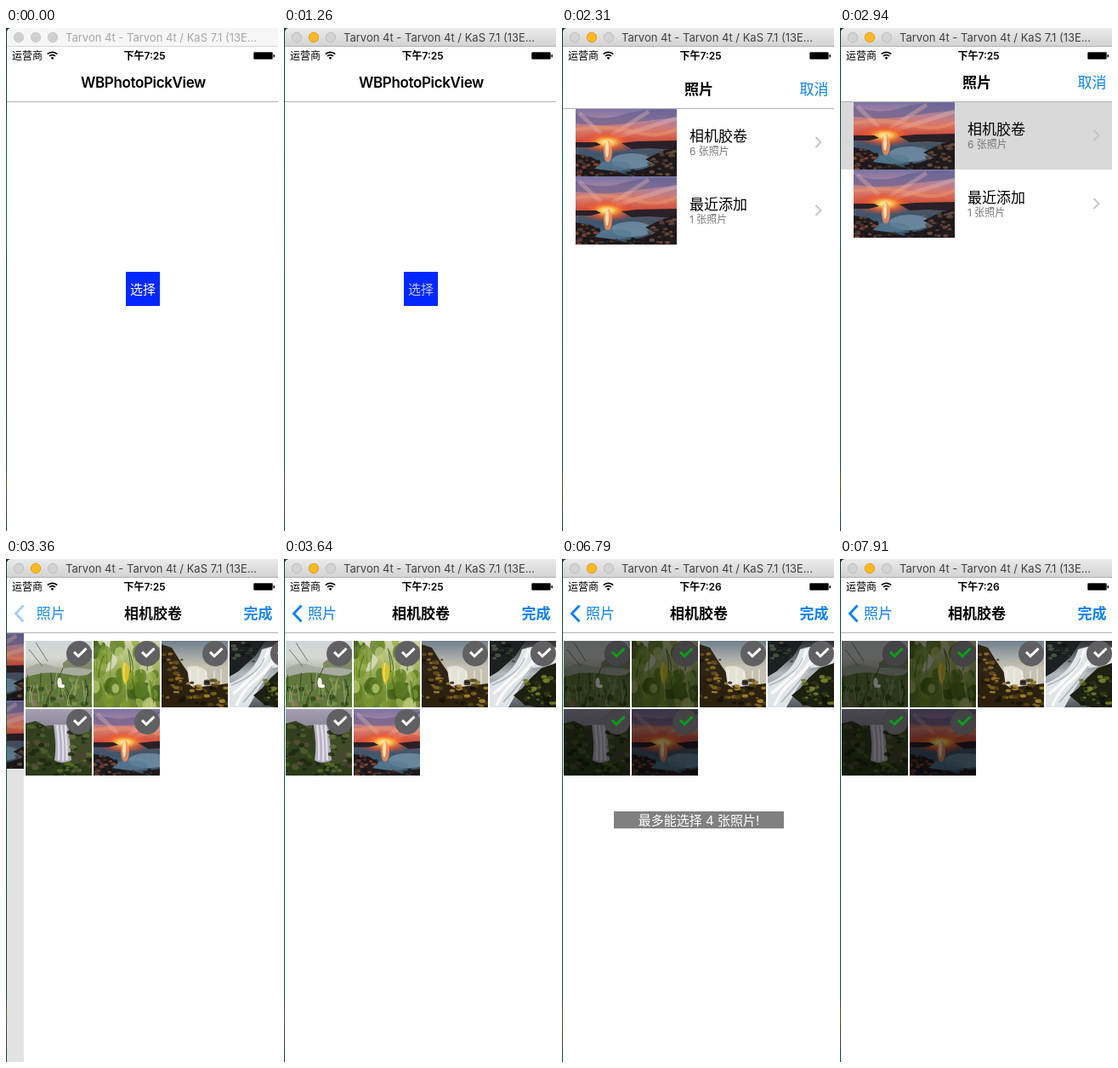
Recreate the animation shown at these times as an HTML page. Size 320 by 590 pixels, loop 8000 ms.

```html
<!DOCTYPE html>
<html lang="zh-CN">
<head>
<meta charset="utf-8">
<title>WBPhotoPickView</title>
<style>
  html, body { margin: 0; width: 100%; height: 100%; overflow: hidden; background: #fff; }
  svg#stage { display: block; width: 320px; height: 590px; }
  text { font-family: Inter, "Noto Sans CJK SC", "Noto Sans CJK", "Noto Sans", sans-serif; font-size: 17px; white-space: pre; }
  .mid { text-anchor: middle; }
  .bold { font-weight: 600; }
  .cjk { font-weight: 500; }
  .blue { fill: #0a80f5; }
  .status { font-size: 12px; }
  .small { font-size: 12px; fill: #777; }
  .note { font-size: 15px; fill: #fff; }
  .line { fill: none; stroke-linecap: butt; stroke-linejoin: miter; }
</style>
</head>
<body>
<svg id="stage" viewBox="0 0 320 590">
  <defs id="defs">
    <linearGradient id="barOn" x2="0" y2="1"><stop stop-color="#ebebeb"/><stop offset="1" stop-color="#d2d2d2"/></linearGradient>
    <linearGradient id="edge" x2="0" y2="1">
      <stop stop-color="#0b3d22"/><stop offset=".3" stop-color="#176238"/><stop offset=".5" stop-color="#0c4a2c"/>
      <stop offset=".87" stop-color="#134a2d"/><stop offset=".9" stop-color="#5a4a28"/><stop offset="1" stop-color="#0d4428"/>
    </linearGradient>
  </defs>
  <rect width="320" height="590" fill="#fff"/>

  <g id="home">
    <text class="mid bold" x="161.5" y="70" letter-spacing="-.35">WBPhotoPickView</text>
    <rect x="1" y="86" width="319" height="1" fill="#b2b2b2"/>
    <rect x="141" y="286" width="40" height="40" fill="#0028ff"/>
    <text id="pick" class="mid note" x="161" y="312">选择</text>
  </g>

  <g id="modal">
    <rect x="1" y="22" width="319" height="568" fill="#fff"/>
    <g id="list">
      <rect x="1" y="86" width="319" height="504" fill="#fff"/>
      <rect id="hit" x="1" y="86" width="319" height="80" fill="#d9d9d9"/>
      <g id="rows"></g>
    </g>
    <rect id="shade" x="1" y="86" width="319" height="504"/>
    <g id="grid"><rect x="0" y="86" width="320" height="504" fill="#fff"/></g>
    <rect x="1" y="86" width="319" height="1" fill="#b2b2b2"/>
    <g id="oldTitle"><text class="mid bold" x="161" y="70">照片</text></g>
    <text id="cancel" class="blue" x="279.5" y="70">取消</text>
    <g id="newNav">
      <path id="back" class="line" d="M20.5 54.5L11.5 64L20.5 73.5" stroke="#0a80f5" stroke-width="2.8"/>
      <g id="backText"><text class="blue" x="28" y="70">照片</text></g>
      <g id="newTitle"><text class="mid bold" x="161" y="70">相机胶卷</text></g>
      <text class="blue bold" x="279.5" y="70">完成</text>
    </g>
  </g>

  <g id="toast">
    <rect x="61" y="296" width="200" height="20" fill="#808080"/>
    <text class="mid note" x="161" y="312">最多能选择 4 张照片!</text>
  </g>

  <rect x="1" y="22" width="319" height="18" fill="#fff"/>
  <text class="status" x="7" y="37">运营商</text>
  <g class="line" stroke="#000" stroke-width="1.7">
    <path d="M48.8 30.7a8 8 0 0 1 11.4 0M51 33a4.9 4.9 0 0 1 7 0"/>
    <path d="M54.5 37l-1.9-2.1a2.7 2.7 0 0 1 3.8 0z" fill="#000" stroke="none"/>
  </g>
  <text id="clock" class="status mid bold" x="163" y="37"></text>
  <rect x="291.5" y="28.5" width="22" height="8" rx="1" stroke="#555"/>
  <rect x="314.5" y="31" width="1.5" height="3.5" rx=".7"/>

  <path d="M0 0H7Q1 0 1 6V22H0z" fill="#123c26"/>
  <g id="bar">
    <path id="barFill" d="M1 22V6Q1 0 7 0H320V22z"/>
    <rect id="barLine" x="1" y="21" width="319" height="1"/>
    <g id="lamps"></g>
    <text id="caption" x="70" y="16" font-size="13" style="font-size:13px">Tarvon 4t - Tarvon 4t / KaS 7.1 (13E...</text>
  </g>
  <rect y="8" width="1" height="582" fill="url(#edge)"/>
</svg>
<script>
const LOOP = 8000, STEP = 70;
const $ = id => document.getElementById(id);
const add = (id, html) => $(id).insertAdjacentHTML('beforeend', html);
const set = (id, attr, value) => $(id).setAttribute(attr, value);

// Photo pieces
let seed = 7;
const rnd = (a, b) => {
  seed = (seed * 16807) % 2147483647;
  return a + (b - a) * seed / 2147483647;
};
const shape = (d, fill, o = 1) => `<path d="${d}" fill="${fill}" opacity="${o}"/>`;
const blob = (x, y, rx, ry, fill, o = 1) =>
  `<ellipse cx="${x}" cy="${y}" rx="${rx}" ry="${ry}" fill="${fill}" opacity="${o}"/>`;
const streak = (d, color, w, o = 1) =>
  `<path d="${d}" fill="none" stroke="${color}" stroke-width="${w}" opacity="${o}"/>`;
function specks(n, x, y, w, h, r, colors, flat = .6) {
  let out = '';
  for (let i = 0; i < n; i++) {
    const s = rnd(r * .4, r);
    out += blob(rnd(x, x + w).toFixed(1), rnd(y, y + h).toFixed(1), s.toFixed(1),
      (s * flat).toFixed(1), colors[i % colors.length], .8);
  }
  return out;
}
function blades(n, x, y, w, h, len, colors) {
  let out = '';
  for (let i = 0; i < n; i++) {
    const bx = rnd(x, x + w), by = rnd(y, y + h), lean = rnd(-7, 7);
    out += streak(`M${bx.toFixed(1)} ${by.toFixed(1)}q0 ${-len / 2} ${lean.toFixed(1)} ${-len}`, colors[i % colors.length], 1, .8);
  }
  return out;
}
function photo(id, w, h, sky, body) {
  const stops = sky.map((c, i) => `<stop offset="${i / (sky.length - 1)}" stop-color="${c}"/>`).join('');
  add('defs', `<linearGradient id="${id}Sky" x2="0" y2="1">${stops}</linearGradient>
    <symbol id="${id}" viewBox="0 0 ${w} ${h}" preserveAspectRatio="xMinYMin slice">
    <rect width="${w}" height="${h}" fill="url(#${id}Sky)"/>${body}</symbol>`);
}

add('defs', `<radialGradient id="glow"><stop stop-color="#fffbd8"/><stop offset=".2" stop-color="#ffd35e"/>
  <stop offset=".5" stop-color="#f4692c" stop-opacity=".8"/><stop offset="1" stop-color="#d83a30" stop-opacity="0"/></radialGradient>`);

photo('dune', 78, 78, ['#cfd6d8', '#d6d8d2', '#a9ad9c', '#56683c', '#35481f'],
  shape('M0 34Q14 22 30 29T78 22V48H0z', '#a8ab9f') +
  shape('M44 26Q58 14 78 10V34Q60 30 44 32z', '#7d8a66') +
  shape('M0 43Q24 34 48 39T78 36V78H0z', '#60783b') +
  streak('M12 2L26 24M4 10L20 30', '#555c58', .8) +
  specks(34, 0, 44, 78, 34, 5, ['#2d4218', '#7c9149', '#49652a', '#8a7562']) +
  blades(34, 0, 52, 78, 26, 20, ['#8ea65b', '#26390f', '#a6b184', '#4b6b2d']) +
  blob(40, 49, 2.6, 6, '#f3f4ed') + blob(43, 53, 3, 2, '#fff'));

photo('leaf', 78, 78, ['#d0d3b0', '#a9b86c', '#7f9a3b', '#6a8030'],
  blob(14, 16, 15, 20, '#e3e3d0', .7) + blob(62, 46, 10, 22, '#dbdfb8', .6) +
  specks(46, 0, 0, 78, 78, 9, ['#5c7d22', '#96ad4b', '#3f5d18', '#b7c674', '#78962f'], 1.3) +
  blades(18, 0, 30, 78, 50, 26, ['#3d5618', '#c8d28c', '#6c8a2c']) +
  shape('M34 25Q43 26 42 38Q41 47 37 52Q31 40 34 25z', '#d8c22c') +
  streak('M37 26Q34 38 37 48', '#f1e06a', 1.5));

photo('cliff', 78, 78, ['#6f7f8c', '#a8aba8', '#dccdb0', '#8f7a55', '#2c200d'],
  shape('M0 4L12 8L22 24L31 37L35 55H0z', '#2d2415') +
  shape('M30 32Q52 24 78 30V51Q54 56 34 54z', '#c4c0b2') +
  shape('M30 31Q42 26 53 35L56 55H33z', '#ece8dd', .8) +
  streak('M34 34V53M43 33V54M52 36V54M62 35V52M70 33V52', '#f7f4ea', 2, .5) +
  shape('M0 40L20 42L38 55L78 50V78H0z', '#2b210e') +
  specks(26, 0, 14, 24, 40, 4, ['#6d521c', '#17110a', '#9a7629']) +
  specks(58, 0, 46, 78, 32, 4.2, ['#8b6b1e', '#171008', '#584313', '#b9922f', '#2b210e']));

photo('rapids', 78, 78, ['#2e3030', '#6c7274', '#b4babd', '#8b9196', '#50575a'],
  shape('M0 0H42L30 18L10 36L0 42z', '#1c2020') +
  shape('M38 10Q62 2 78 8V28L50 32Q40 46 22 78H0V50Q30 38 38 10z', '#dfe4e7') +
  streak('M46 10Q38 36 4 62M56 14Q48 32 26 50Q16 58 8 76M70 16Q50 24 40 38', '#fff', 3.5, .8) +
  streak('M41 20Q34 40 2 52M50 30Q38 48 16 72', '#8d979d', 1.6, .6) +
  shape('M78 26L61 32L48 44L38 56L28 64L40 74L54 78H78z', '#1c2010') +
  specks(18, 2, 2, 28, 22, 4, ['#3b4231', '#101414', '#525a4c']) +
  specks(46, 42, 42, 36, 34, 4.2, ['#5b681f', '#10140a', '#7f8a2c', '#2f3916']));

photo('falls', 78, 78, ['#a4a0b2', '#8e8a9c', '#68705c', '#354326', '#27361a'],
  shape('M0 17L12 14L24 20L33 19L36 50L44 78H0z', '#33401f') +
  shape('M78 10L62 17L50 16L53 42L50 62L60 78H78z', '#414b2a') +
  shape('M33 18H50Q52 40 54 60Q43 66 34 60Q37 40 33 18z', '#b6b1c0') +
  streak('M37 19Q40 40 39 60M42 19Q45 40 44 61M47 19Q48 40 49 60', '#edeaf2', 2.3, .8) +
  shape('M0 58Q22 54 36 62T78 58V78H0z', '#2b3b19') +
  specks(32, 0, 20, 30, 54, 4.5, ['#1b2512', '#4d6128', '#5b4e39']) +
  specks(34, 52, 20, 26, 54, 4.5, ['#20290f', '#617036', '#4e4434']) +
  specks(16, 20, 64, 40, 14, 4, ['#557029', '#1b2512']));

photo('sunset', 119, 80, ['#7774a4', '#a982a0', '#d8786a', '#d14d38', '#3d4963', '#516f88', '#28313c'],
  shape('M0 6Q30 16 55 8T119 2V11Q86 14 60 18T0 18z', '#5e5c8c', .6) +
  streak('M42 32L86 4M48 34L119 12M30 30L4 6', '#f0bdb0', 5, .35) +
  streak('M0 25Q40 20 70 28T119 24', '#ed986b', 4, .5) +
  `<rect y="40" width="119" height="40" fill="#3f5a70" opacity=".7"/>` +
  blob(37, 40, 34, 14, 'url(#glow)') +
  shape('M0 40H24L30 43L18 46H0zM54 41L72 39L119 38V49L86 47L66 48z', '#2a2028') +
  blob(38, 51, 5, 13, '#ff9360', .8) + blob(37, 48, 2, 10, '#fff0bb', .85) +
  blob(66, 62, 24, 9, '#7695aa', .75) + blob(44, 68, 22, 6, '#587c94', .7) +
  shape('M0 54L18 57L30 64L22 71L46 74L68 80H0zM119 45L96 53L82 60L94 66L78 72L58 75L70 80H119z', '#211a1c') +
  specks(34, 0, 56, 27, 24, 3.4, ['#5c3d33', '#17161b', '#8a4b36']) +
  specks(40, 82, 50, 37, 30, 3.4, ['#5b4538', '#16151a', '#785643']) +
  specks(20, 24, 73, 60, 7, 3, ['#4b372f', '#15161c']));

// List rows
[['相机胶卷', 6], ['最近添加', 1]].forEach(([name, count], i) => add('rows',
  `<g transform="translate(0 ${86 + 80 * i})"><use href="#sunset" x="16" width="119" height="80"/>
  <text class="cjk" style="font-weight:400" x="150" y="39">${name}</text>
  <text class="small" x="150" y="55">${count} 张照片</text>
  <path class="line" d="M298.5 34L304.5 40L298.5 46" stroke="#c2c2c7" stroke-width="1.8"/></g>`));

// Photo cells
const badge = (fill, tick) => `<circle cx="63" cy="15" r="15" fill="${fill}"/>
  <path class="line" d="M57 13.2L62 18L71.5 8.8" stroke="${tick}" stroke-width="3"/>`;
['dune', 'leaf', 'cliff', 'rapids', 'falls', 'sunset'].forEach((name, i) => add('grid',
  `<g transform="translate(${2 + 80 * (i % 4)} ${96 + 80 * Math.floor(i / 4)})">
  <use href="#${name}" width="78" height="78"/>${badge('#606062', '#fff')}
  <g id="mark${i}"><rect width="78" height="78" fill="#000" opacity=".55"/>${badge('#434345', '#0a9c18')}</g></g>`));

[15, 35, 55].forEach((x, i) => add('lamps', `<circle id="lamp${i}" cx="${x}" cy="11" r="5.7"/>`));

const tapFade = [.2, .25, .4, .6, .75, .9, 1];
// index, first change, number of steps
const marks = [[0, 3920, 5], [4, 4550, 4], [5, 5180, 5], [1, 6020, 4]];

// Share of the way left in a transition whose first visible step is at `from`
function left(t, from, first) {
  const n = Math.floor((t - from) / STEP);
  return n < 0 ? 1 : n >= 7 ? 0 : first * .46 ** n;
}
const show = (id, on) => set(id, 'visibility', on ? 'visible' : 'hidden');
const move = (id, x, y) => set(id, 'transform', `translate(${x.toFixed(2)} ${y.toFixed(2)})`);

function draw(t) {
  const active = t >= 770;
  set('barFill', 'fill', active ? 'url(#barOn)' : '#f6f6f6');
  set('barLine', 'fill', active ? '#b1b1b1' : '#d4d4d4');
  set('caption', 'fill', active ? '#404040' : '#a6a6a6');
  for (let i = 0; i < 3; i++) {
    const gold = active && i === 1;
    set('lamp' + i, 'fill', gold ? '#fdb924' : active ? '#d3d3d3' : '#cfcfcf');
    set('lamp' + i, 'stroke', gold ? '#dd9e1c' : active ? '#bdbdbd' : '#cacaca');
  }
  $('clock').textContent = t < 5740 ? '下午7:25' : '下午7:26';

  const tap = Math.floor((t - 980) / STEP);
  set('pick', 'opacity', tap < 0 ? 1 : tapFade[Math.min(tap, 6)]);

  const rise = left(t, 1960, .658);
  move('modal', 0, Math.round(568 * rise));
  show('modal', rise < 1);

  const q = left(t, 3150, .68), pushed = q < 1;
  set('hit', 'opacity', t >= 2940 ? 1 : 0);
  move('list', -96 * (1 - q), 0);
  set('shade', 'opacity', .12 * (1 - q));
  move('grid', Math.round(320 * q), 0);
  set('grid', 'opacity', pushed ? 1 : 0);
  move('oldTitle', -116 * (1 - q), 0);
  set('oldTitle', 'opacity', pushed ? Math.max(0, q * 1.1 - .1) : 1);
  set('cancel', 'opacity', pushed ? Math.max(0, q * 1.1 - .1) : 1);
  set('newNav', 'opacity', pushed ? 1 - q : 0);
  set('back', 'opacity', Math.max(0, 1 - 9 * q));
  move('backText', 116 * q, 0);
  move('newTitle', 182 * q, 0);

  for (const [i, from, n] of marks) {
    const k = Math.floor((t - from) / STEP) + 1;
    set('mark' + i, 'opacity', Math.min(1, Math.max(0, k / n)));
  }
  for (const i of [2, 3]) set('mark' + i, 'opacity', 0);
  show('toast', t >= 6790 && t < 7910);
}

const start = performance.now();
function tick() {
  draw((performance.now() - start) % LOOP);
  requestAnimationFrame(tick);
}
tick();
</script>
</body>
</html>
```
